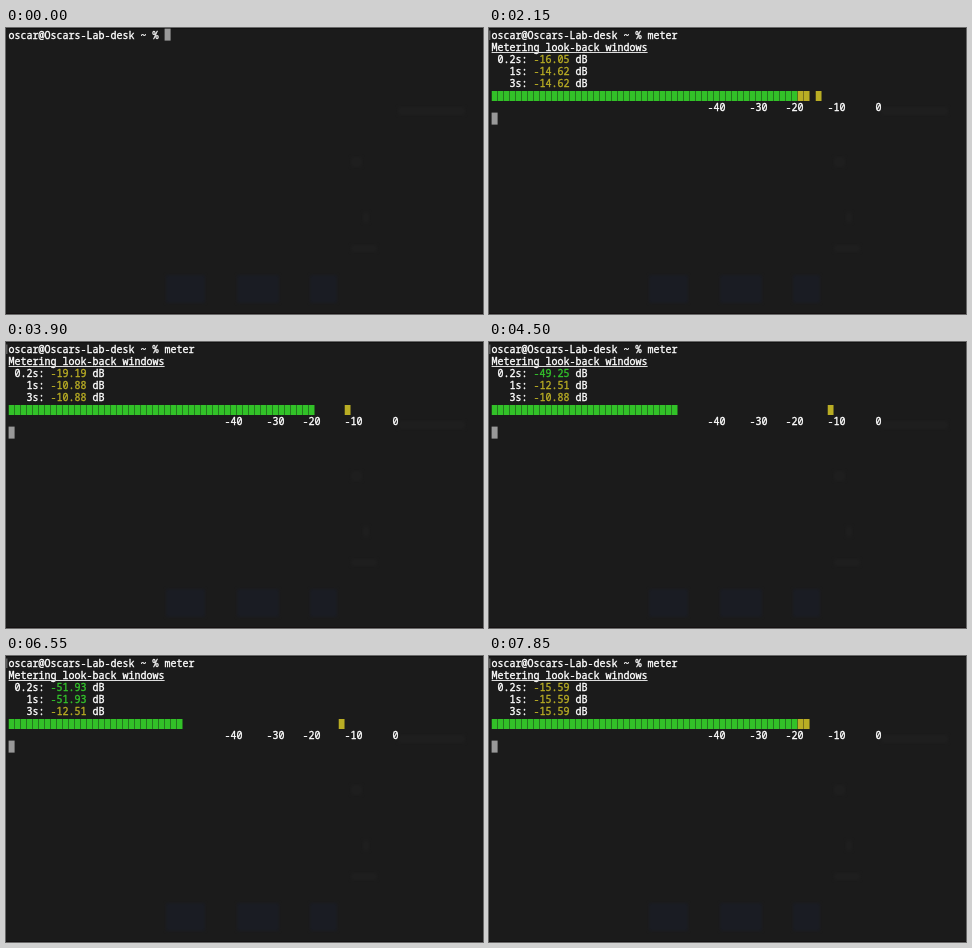
These frames come from a looping animation (477x286 px, 8000 ms). An HTML page with a canvas:

```html
<!DOCTYPE html>
<html lang="en">
<head>
<meta charset="utf-8">
<title>Terminal level meter</title>
<style>
  html, body { margin: 0; width: 100%; height: 100%; overflow: hidden; background: #1b1b1b; }
  canvas { display: block; }
</style>
</head>
<body>
<canvas id="stage" width="477" height="286"></canvas>
<script>
const ctx = document.getElementById('stage').getContext('2d');
const LOOP = 8000, LEFT = 2.6, CELL = 6, ROW = 12;
const WHITE = '#fff', GREEN = '#33c42b', YELLOW = '#b9ad24', GREY = '#999';
const PROMPT = 'oscar@Oscars-Lab-desk ~ % ';
const HEADING = 'Metering look-back windows';

// Moves of the level: first update, last update, dB reached; it rests in between
const MOVES = [
  [1100, 1100, -43.5], [1400, 1450, -41.2], [1650, 1950, -14.62], [2150, 2150, -16.05],
  [2350, 2450, -24.52], [2550, 2600, -13.14], [2650, 2900, -27.74], [2950, 3150, -15.36],
  [3350, 3450, -13.3], [3700, 3700, -10.88], [3750, 3750, -12.51], [3800, 4500, -49.25],
  [4600, 4850, -53.12], [4950, 5150, -51.22], [5200, 5400, -53.64], [5550, 5700, -53.04],
  [5850, 6400, -53.55], [6550, 6550, -51.93], [6600, 7200, -47.18], [7350, 7450, -39.85],
  [7650, 7850, -15.59]
];

const noise = n => Math.abs(Math.sin(n * 12.9898) * 43758.5453) % 1;

// Update about every 67 ms on a 50 ms clock, dipping at random on the way
function sample(moves) {
  const list = [];
  let start = moves[0][2];
  for (const [from, to, end] of moves) {
    const gaps = Math.round((to - from) / 67);
    for (let k = 0; k <= gaps; k++) {
      const u = (k + 1) / (gaps + 1);
      const dip = (1 + Math.abs(end - start) * 0.25) * Math.sin(Math.PI * u) * noise(from + k);
      const t = Math.round((from + (to - from) * k / (gaps || 1)) / 50) * 50;
      list.push({ t, db: start + (end - start) * u - dip });
    }
    start = end;
  }
  return list;
}
const readings = sample(MOVES);

const column = db => Math.floor(64 + db * 2 / 3);
const hue = db => db < -20 ? GREEN : YELLOW;

function rect(x, y, w, h, color) {
  ctx.fillStyle = color;
  ctx.fillRect(x, y, w, h);
}

function print(row, col, text, color = WHITE) {
  ctx.fillStyle = ctx.strokeStyle = color;
  [...text].forEach((ch, i) => {
    const x = LEFT + (col + i) * CELL, y = 10.7 + row * ROW;
    ctx.fillText(ch, x, y);
    ctx.strokeText(ch, x, y);
  });
}

function cursor(row, col) {
  rect(LEFT + col * CELL, 0.6 + row * ROW, CELL, ROW, GREY);
}

function block(i) {
  const x = LEFT + i * CELL, yellow = i > 50;
  rect(x, 63, CELL, 10, yellow ? '#877e20' : '#27851f');
  rect(x + 0.4, 63, CELL - 0.8, 10, yellow ? YELLOW : '#32c128');
}

function backdrop() {
  rect(0, 0, 477, 286, '#1b1b1b');
  ctx.filter = 'blur(1.5px)';
  for (const [x, w] of [[160, 39], [231, 42], [304, 27]]) rect(x, 247, w, 28, '#1a1c23');
  for (const [x, y, w, h] of [[345, 129, 11, 10], [357, 184, 6, 11], [345, 217, 26, 7], [392, 79, 67, 8]])
    rect(x, y, w, h, '#1e1e1e');
  ctx.filter = 'none';
  rect(0, 0, 477, 1, '#121212');
  rect(0, 285, 477, 1, '#151112');
}

function meter(t) {
  const past = readings.filter(r => r.t <= t);
  const last = past[past.length - 1];
  // The longer windows hold the loudest recent reading
  const loudest = span => Math.max(...past.filter(r => last.t - r.t < span).map(r => r.db));
  const peak = loudest(2850);
  [[' 0.2s:', last.db], ['   1s:', loudest(800)], ['   3s:', peak]].forEach(([label, db], i) => {
    print(2 + i, 0, label);
    print(2 + i, 7, db.toFixed(2), hue(db));
    print(2 + i, 14, 'dB');
  });
  for (let i = 0; i < column(last.db); i++) block(i);
  if (peak > last.db) block(column(peak));
  for (let db = -40; db <= 0; db += 10) {
    const label = String(db);
    print(6, column(db) - (label.length >> 1), label);
  }
}

function draw(t) {
  backdrop();
  ctx.font = '500 10px "Noto Sans Mono", "DejaVu Sans Mono", monospace';
  ctx.lineWidth = 0.35;
  ctx.lineJoin = 'round';
  const typed = 'meter'.slice(0, Math.max(0, Math.floor((t - 400) / 87) + 1));
  print(0, 0, PROMPT + typed);
  if (t < 900) return cursor(0, PROMPT.length + typed.length);

  rect(0.4, 2.5, 0.9, 9.5, '#8a8a8a');
  if (t < 1050) return cursor(1, 0);

  print(1, 0, HEADING);
  rect(LEFT, 24, HEADING.length * CELL, 1, '#dcdcdc');
  if (t < 1100) return cursor(2, 0);

  meter(t);
  cursor(7, 0);
}

function tick() {
  draw(performance.now() % LOOP);
  requestAnimationFrame(tick);
}
tick();
</script>
</body>
</html>
```
